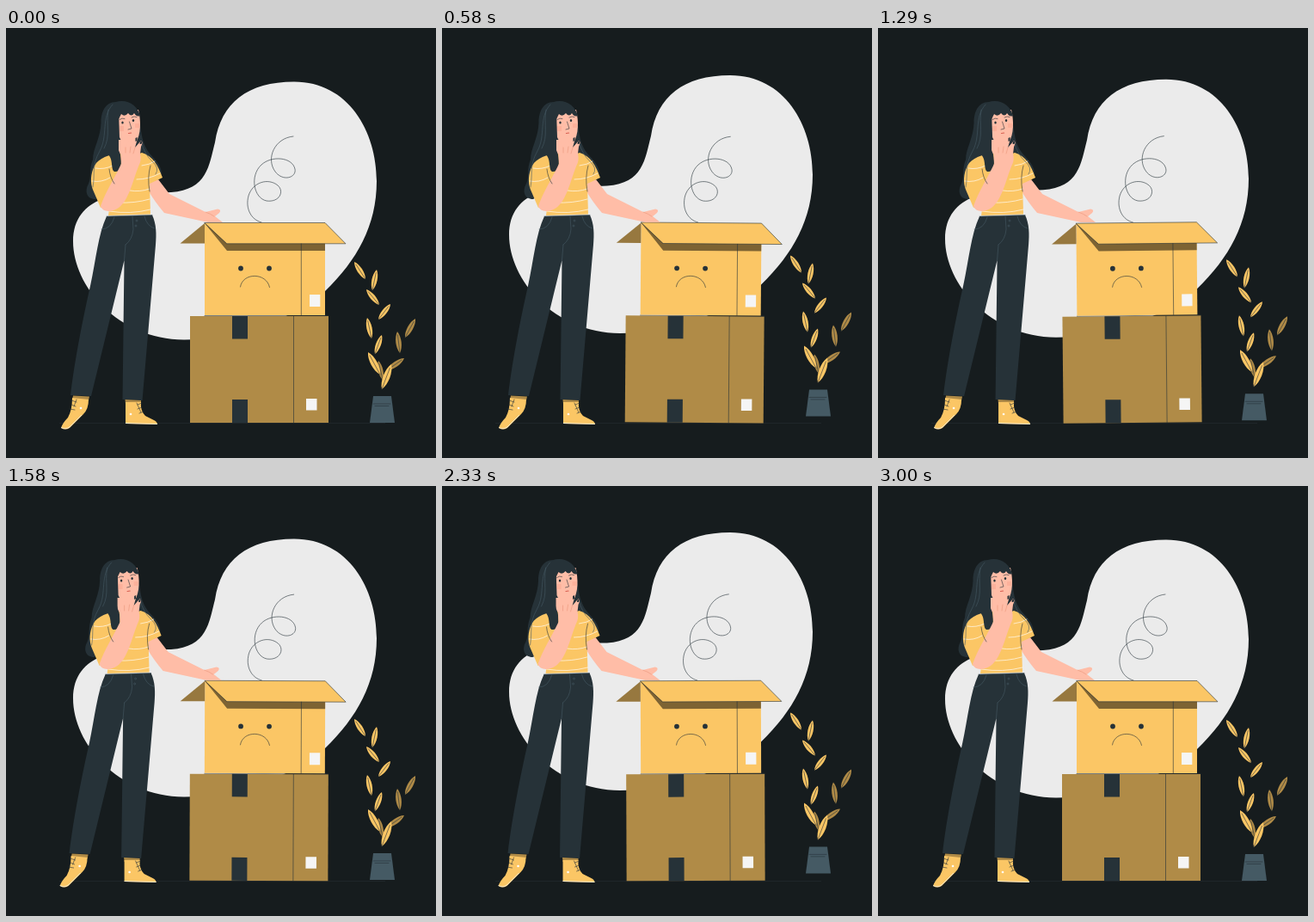
Write an HTML page that moves like this. It is 500 px wide and 500 px high and loops after 3040 ms.

```html
<!DOCTYPE html>
<html lang="en">
<head>
<meta charset="utf-8">
<title>Empty box</title>
<style>
html, body { margin: 0; width: 100%; height: 100%; overflow: hidden; background: #161c1e }
svg { display: block; width: 100vw; height: 100vh }
.ink { fill: none; stroke: #263238; stroke-width: .6; stroke-linecap: round; stroke-linejoin: round }
.strand { fill: none; stroke: #455a64; stroke-width: .6; stroke-linecap: round }
.stripe { fill: none; stroke: #fff; stroke-width: .8; stroke-linecap: round; opacity: .8 }
.dark { fill: #263238 }
.sun { fill: #fbc665 }
.tan { fill: #b08b47 }
.skin { fill: #ffbda7 }
.crease { fill: none; stroke: #e58f72; stroke-width: .5; stroke-linecap: round }
</style>
</head>
<body>
<svg viewBox="0 0 500 500">
  <path id="blob" fill="#ebebeb" d="M335 62.500C398 62.500 431 120 431 178C431 230 408 270 371 306C330 342 260 362 207 362.500C130 362 78 300 78 248C78 222 92 206 112 199C145 188 165 192 192 191C234 188 236 160 243 133C250 87 281 62.500 335 62.500Z"/>
  <path d="M62 459.500H441" stroke="#232c30" stroke-width=".7"/>

  <g id="plant">
    <g id="leaves"></g>
    <path fill="#455a64" d="M427 428H448L452 459H423Z"/>
    <path class="ink" d="M427 437H447M429 439.500H445"/>
  </g>

  <g id="boxes">
    <path class="ink" d="M334 126C312 128 302 152 313 167C322 179 338 174 336 164C333 150 309 148 297 159C283 172 288 198 303 201C318 203 324 190 316 183C305 174 287 179 282 195C278 210 285 223 297 226"/>
    <path class="tan" d="M214 335H375V459H214Z"/>
    <path class="dark" d="M263 335H281V361.500H263ZM263 432H281V459H263Z"/>
    <path class="ink" d="M334.500 335V459M231 334.500H375"/>
    <path class="sun" d="M231 227H371V334H231Z"/>
    <path fill="#7d6333" d="M231 227L257 259H371V250Z"/>
    <path fill="#97783f" d="M231 227L202.500 250.500H231Z"/>
    <path class="sun" d="M231 226.500H371L395 250.800H257Z"/>
    <path class="ink" d="M231 226.500H371L395 250.800H257ZM343.300 251V334"/>
    <path fill="#f5f5f5" d="M349 431H361.500V444.500H349ZM353 310H365.300V324H353Z"/>
    <g class="dark"><circle cx="273" cy="279.500" r="2.900"/><circle cx="306" cy="279.500" r="2.900"/></g>
    <path class="ink" d="M272.500 301C275 284 303 284 306.500 301.500"/>
  </g>

  <g id="woman">
    <!-- back hair -->
    <path class="dark" d="M128 86C115 86 110.500 98 110.500 110C110 128 101 140 101 153C96 165 100 172 96 181C91 190 94 199 104 199L120 190L166 176C176 180 183 174 180 164C177 154 168 150 162 138C156 126 157 108 153 98C149 87 138 84 128 86Z"/>
    <!-- reaching arm -->
    <path class="skin" d="M166 180L177 176L190 193L232 214L246 210.500Q251 211 248 215L243 219L252 226H235L184 215Q173 202 166 190Z"/>
    <path class="crease" d="M232 214Q238 216 242 219"/>
    <!-- neck and shirt -->
    <path class="skin" d="M131 130H148V152H131Z"/>
    <path class="sun" d="M132 146C120 147 108 151 103 160C98 170 98 180 101 188L110 209L121 203L119 218L168 216.500L167 181L182 174C177 160 171 149 158 145L146 149Z"/>
    <path class="stripe" d="M104 163Q114 165 124 160M100 178Q111 180 121 174M158 160Q167 159 173 155M152 176Q166 176 179 169M144 189Q156 191 167 187M130 203Q150 204 167 199M120 213Q145 217 168 211"/>
    <path class="ink" d="M168 160Q164 174 167 190"/>
    <!-- face -->
    <path class="skin" d="M131 97L154 95C157 108 157 124 151 133C146 138 135 136 132 127Z"/>
    <path fill="#f48f78" opacity=".25" d="M132 114h5v6h-5zM150 111h5v5h-5z"/>
    <path class="dark" d="M128 86C141 82 153 90 156 102Q152 104 149 99Q146 104 142 99Q138 104 134 100L131 106C131 122 127 135 133 147C135 158 134 168 126 167C121 164 126 150 116 145C108 133 112 100 128 86Z"/>
    <path class="ink" d="M132 106.500Q135 104 138 105.500M146 104Q149 102 152 103.500M143.500 109L146 117L142 118"/>
    <g class="dark"><ellipse cx="135.500" cy="110" rx="1.200" ry="1.600"/><ellipse cx="148" cy="107.500" rx="1.200" ry="1.600"/></g>
    <path stroke="#d85e50" stroke-width="1.200" stroke-linecap="round" d="M142.500 122.500L145.500 122"/>
    <path class="strand" d="M124 89C110 104 119 125 109 143S104 168 101 185M119 95C116 113 122 125 114 140M157 132Q161 147 170 155T174 170"/>
    <!-- raised arm and hand -->
    <path class="skin" d="M110 207C116 190 126 175 134 158L133 139Q134 130 137 132L139 139L143 129Q146 127 146 131L145 138L151 127Q154 127 152 132L150 139L157 131Q160 132 157 138L156 146Q158 154 154 161C147 179 143 200 131 209C122 215 112 214 110 207Z"/>
    <path class="dark" d="M150.500 128l2-1 0 4-2 1zM156 132l2.500-1-1 4-2 0z"/>
    <path class="crease" d="M139 139L139 145M145 138L144 145M150 139L148 146"/>
    <path class="ink" d="M120 164Q121 174 126 181"/>
    <!-- trousers -->
    <path class="dark" d="M117 219L170 217.500C175 228 175 240 174 252L158.500 433L135.500 432L137.500 270L99 428L75 427C80 385 90 335 98 300C105 268 107 240 117 219Z"/>
    <path class="strand" d="M117 219L170 217.500M111 234Q122 234 126 220M147 219L148 234Q147 246 139 252M161 219Q164 231 173 233M137.500 270L139 252"/>
    <circle cx="152" cy="224" r="1" fill="none" stroke="#455a64" stroke-width=".6"/>
    <circle cx="151" cy="230" r="1" fill="none" stroke="#455a64" stroke-width=".6"/>
    <!-- shoes -->
    <path class="tan" d="M78 427.500L97 428.500L96 433H77ZM138.500 432L157 433V437H139Z"/>
    <path class="sun" d="M77 430L96 432Q96 443 90 449L74 465Q69 468 64 465Q66 459 72 453Q77 444 77 430ZM139 435H157Q156 445 162 451L172 456Q176 458 176 461L139 460Z"/>
    <path fill="none" stroke="#fff" stroke-width=".7" d="M64 464.500Q69 467.500 74 464L88 450M139 459.500L176 460.500"/>
    <g fill="#fff"><circle cx="87" cy="442" r="1.300"/><circle cx="145" cy="449" r="1.300"/></g>
    <path class="ink" d="M76 433L82 435M76 438L81 440M74 443L80 444M82 432L79 440M153 438L158 436M153 443L158 441M155 448L160 446M152 436L157 447"/>
  </g>
</svg>
<script>
const $ = id => document.getElementById(id);

// Leaf tip, leaf base, shade
const leaves = [
  [405, 272, 418, 292, 0], [431, 281, 426, 305, 0], [419, 304, 434, 322, 0],
  [447, 321, 433, 339, 0], [420, 337, 425, 361, 0], [437, 357, 429, 379, 0],
  [455, 353, 458, 378, 1], [476, 338, 464, 360, 1], [463, 384, 443, 398, 1],
  [433, 387, 438, 409, 1], [421, 377, 435, 403, 0], [448, 391, 437, 420, 0]
];
$('leaves').innerHTML = leaves.map(([x, y, u, v, shade]) => {
  const dx = (v - y) * .17, dy = (x - u) * .17;
  const at = (k, side) => `${x + (u - x) * k + dx * side} ${y + (v - y) * k + dy * side}`;
  const edge = side => `C${at(.25, side)} ${at(.75, side)}`;
  return `<path class="${shade ? 'tan' : 'sun'}" d="M${x} ${y}${edge(1)} ${u} ${v}
    C${at(.75, -1)} ${at(.25, -1)} ${x} ${y}Z"/><path class="ink" d="M${at(.15, 0)}L${u} ${v}"/>`;
}).join('');

const shakeStops = [0, -1, 2, -4, 4, -4, 4, -4, 2, -1, 0];

function shake(t) {
  const pos = t / 300 % 10, i = Math.floor(pos), u = (pos - i) ** .75;
  return shakeStops[i] + (shakeStops[i + 1] - shakeStops[i]) * u * u * (3 - 2 * u);
}

// Triangle wave: 0, 1, 0, -1
const sway = p => p < .25 ? p * 4 : p < .75 ? 2 - p * 4 : p * 4 - 4;

function draw(now) {
  const step = 1000 / 24;
  const t = Math.floor((now % 3040 + 4) / step) * step;
  const p = t / 1500 % 1;
  const lift = `translate(0 ${-9.7 * (1 - Math.abs(1 - 2 * p))})`;
  $('blob').setAttribute('transform', lift);
  $('plant').setAttribute('transform', lift);
  $('boxes').setAttribute('transform', `rotate(${sway(p)} 298 292)`);
  $('woman').setAttribute('transform', `translate(${shake(t)} 0)`);
}

const start = performance.now();
(function tick() {
  draw(performance.now() - start);
  requestAnimationFrame(tick);
})();
</script>
</body>
</html>
```
